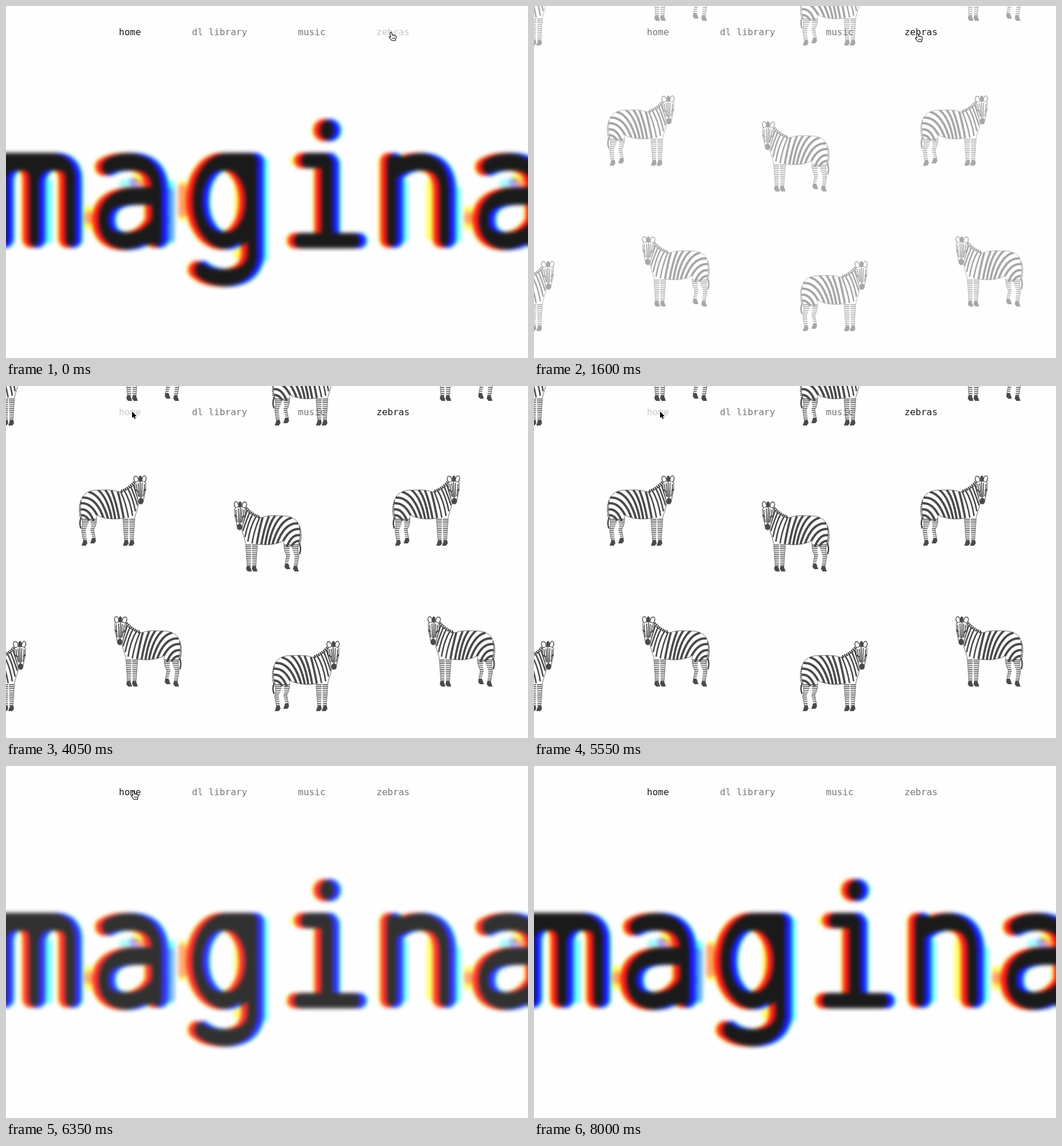
Write an HTML page that moves like this. It is 911 by 615 pixels and loops after 9360 ms.

```html
<!DOCTYPE html>
<html lang="en">
<head>
<meta charset="utf-8">
<title>Page transition</title>
<style>
html, body { margin: 0; width: 100%; height: 100%; overflow: hidden; background: #fefefe; }
svg { display: block; width: 911px; height: 615px; }

.nav { font: 16px "DejaVu Sans Mono", monospace; fill: #767676; }
.loop { animation: 9360ms step-end infinite; }

/* Blurred title: three ink layers, shifted sideways and multiplied */
#title { isolation: isolate; animation-name: title; }
.ink { mix-blend-mode: multiply; filter: blur(3.5px); fill: none; stroke-width: 31; stroke-linecap: round; stroke-linejoin: round; }
.cyan { stroke: rgb(26,255,255); }
.magenta { stroke: rgb(255,26,255); }
.yellow { stroke: rgb(255,255,26); }
.fringe { stroke-width: 15; opacity: .65; }
.faint { opacity: .4; }

#herd { animation-name: herd; }
#home { animation-name: home; }
#zebras { animation-name: zebras; }
#cursor { animation-name: cursor; }
#hand { animation-name: hand; }
#arrow { animation-name: arrow; }

@keyframes title {
  0% { opacity: 1 }
  11.111% { opacity: .62 }
  13.354% { opacity: .16 }
  15.224% { opacity: 0 }
  64.423% { opacity: .22 }
  66.132% { opacity: .6 }
  67.841% { opacity: .9 }
  69.764%, 100% { opacity: 1 }
}
@keyframes herd {
  0% { opacity: 0 }
  15.224% { opacity: .12 }
  17.094% { opacity: .48 }
  19.017% { opacity: .83 }
  20.94% { opacity: 1 }
  60.897% { opacity: .68 }
  62.713% { opacity: .22 }
  64.423%, 100% { opacity: 0 }
}
@keyframes home {
  0% { fill: #1a1a1a }
  15.224% { fill: #767676 }
  40.064% { fill: #a4a4a4 }
  41.666% { fill: #c8c8c8 }
  64.423%, 100% { fill: #1a1a1a }
}
@keyframes zebras {
  0% { fill: #c6c6c6 }
  15.224% { fill: #1a1a1a }
  64.423%, 100% { fill: #767676 }
}
@keyframes cursor {
  0% { transform: translate(673px, 45px) }
  17.094% { transform: translate(670px, 47px) }
  19.017% { transform: translate(664px, 50px) }
  20.94% { transform: translate(642px, 58px) }
  22.756% { transform: translate(612px, 64px); animation-timing-function: steps(6, end) }
  32.158% { transform: translate(362px, 84px) }
  33.76% { transform: translate(306px, 79px) }
  35.363% { transform: translate(284px, 70px); animation-timing-function: steps(5, end) }
  43.269% { transform: translate(220px, 44px) }
  60.897% { transform: translate(223px, 43px) }
  69.764% { transform: translate(235px, 40px) }
  71.367% { transform: translate(300px, 45px); animation-timing-function: steps(7, end) }
  82.264% { transform: translate(754px, 124px) }
  83.867%, 100% { transform: translate(841px, 125px) }
}
@keyframes hand {
  0% { opacity: 1 }
  20.94% { opacity: 0 }
  60.897% { opacity: 1 }
  71.367%, 100% { opacity: 0 }
}
@keyframes arrow {
  0% { opacity: 0 }
  20.94% { opacity: 1 }
  60.897% { opacity: 0 }
  71.367% { opacity: 1 }
  85.47%, 100% { opacity: 0 }
}
</style>
</head>
<body>
<svg viewBox="0 0 911 615">
  <defs>
    <g id="letter-a">
      <path d="M176 281Q190 272 214 272Q262 272 263 322V407"/>
      <path d="M262 332H222Q172 335 170 372Q170 410 209 411Q246 409 264 374"/>
    </g>
    <g id="letters">
      <path d="M-22 272H86M-7 407V300Q0 272 22 272Q49 272 49 305V407M49 302Q58 272 82 272Q112 272 112 304V407"/>
      <use href="#letter-a"/>
      <ellipse cx="380" cy="341" rx="46" ry="69"/>
      <path d="M386 272H430V436Q425 474 380 475Q352 474 338 461"/>
      <path d="M560 216.500V217.500" stroke-width="38"/>
      <path d="M521 270H560V410M509 410H611" stroke-width="27"/>
      <path d="M560 276V405" stroke-width="34"/>
      <path d="M673 272V407M673 295Q692 272 722 272Q764 273 765 322V407"/>
      <use href="#letter-a" x="663.500"/>
    </g>

    <clipPath id="body">
      <path d="M70 29C58 24 44 26 30 26C14 27 4 35 3 50C2 60 3 68 5 78L27 80 31 69C42 76 62 78 78 75L97 73C100 62 102 55 105 46L98 14C92 20 82 26 70 29Z"/>
    </clipPath>
    <clipPath id="legs">
      <path d="M4 72H19Q17 87 12 95L14 115H8L5 97Q8 86 4 72ZM18 72H31Q32 86 26 95L29 111H24L20 95Q24 86 18 72ZM77 70H87L86 115H80ZM88 70H98L95 115H89Z"/>
    </clipPath>
    <path id="hoof" d="M3 0H9L10 5 7 9H0Z"/>
    <g id="zebra" fill="none" stroke="#4a4a4a">
      <g clip-path="url(#body)" stroke-width="4">
        <path d="M1 70Q12 67 20 82M1 60Q17 56 26 80M2 49Q22 46 34 74M6 39Q31 37 44 77M17 29Q40 34 52 79"/>
        <path d="M33 25Q51 39 58 79M46 25Q59 42 64 79M57 26Q66 48 71 79M68 28Q74 50 79 78" stroke-width="3.800"/>
        <path d="M73 28Q83 50 87 76M79 26Q90 44 94 71M85 22Q94 38 99 63M90 18Q96 32 103 53M95 15Q99 28 104 43" stroke-width="2.600"/>
      </g>
      <path d="M97 16C91 21 82 27 70 29C58 24 44 26 30 26C14 27 4 35 3 50Q2 62 5 74M31 69C42 76 62 78 78 75M98 72Q102 60 105 48" stroke-width=".8"/>
      <path d="M74 28Q88 23 97 12" stroke-width="5" stroke-dasharray="2.500 1.200"/>
      <path d="M50 76V116" clip-path="url(#legs)" stroke-width="110" stroke-dasharray="1.400 1.900"/>
      <path d="M5 72Q8 86 5 97L8 114M31 70Q32 86 26 95L29 111M77 75L80 114M98 72L95 114" stroke-width=".7"/>
      <path d="M4 44Q-1 58 3 74" stroke-width="2" stroke-dasharray="2 1.200"/>
      <path d="M4 74Q0 84 4 93" stroke-width="2.600"/>
      <g fill="#4a4a4a" stroke="none">
        <use href="#hoof" x="5" y="114"/>
        <use href="#hoof" x="20" y="110"/>
        <use href="#hoof" x="77" y="114"/>
        <use href="#hoof" x="87" y="114"/>
      </g>
      <g fill="#fefefe" stroke-width="1.500">
        <ellipse cx="100" cy="7" rx="3.800" ry="5.500" transform="rotate(-18 100 7)"/>
        <ellipse cx="114" cy="6.500" rx="3.500" ry="5.500" transform="rotate(12 114 6.500)"/>
        <path d="M98 13Q108 7 117 13Q118 25 114 38L112 48Q108 52 104 48L102 37Q97 24 98 13Z" stroke-width="1"/>
      </g>
      <path d="M100.500 15Q101 26 104.500 37M104 14L106 38M107 12L108 40M110.500 13L110 38M114.500 15Q115 25 112.500 37" stroke-width="1.600"/>
      <path d="M99 25L104 29M113 28L117 24" stroke-width="2.400"/>
      <g fill="#4a4a4a" stroke="none">
        <ellipse cx="107.500" cy="6" rx="3" ry="5.500"/>
        <ellipse cx="108.500" cy="45" rx="4.500" ry="5.500"/>
      </g>
    </g>
    <g id="four">
      <use href="#zebra" transform="translate(127 156)"/>
      <use href="#zebra" transform="translate(516 201) scale(-1 1)"/>
      <use href="#zebra" transform="translate(307 402) scale(-1 1)"/>
      <use href="#zebra" transform="translate(464 445)"/>
    </g>
  </defs>

  <g id="title" class="loop">
    <g class="ink yellow">
      <use href="#letters" x="-7"/>
      <path class="fringe" d="M308 312V368M143 356V384M806 356V384M741 310V402M406 300V378M404 432V434M503 270H506M228 300L238 308M891 300L901 308"/>
    </g>
    <g class="ink magenta">
      <use href="#letters" x="-4"/>
      <use href="#letters" x="4"/>
      <path class="fringe faint" d="M308 318V362M144 366V374M807 366V374M286 325V405M222 308L240 312M885 308L903 312"/>
    </g>
    <g class="ink cyan">
      <use href="#letters" x="7"/>
      <path class="fringe" d="M73 310V408M287 312V408M450 272V440M786 322V406M694 310V406"/>
      <path class="fringe faint" d="M205 311L222 308M868 311L885 308"/>
    </g>
  </g>

  <g id="herd" class="loop">
    <use href="#four"/>
    <use href="#four" x="547"/>
    <use href="#four" x="-547"/>
    <use href="#four" y="-499"/>
    <use href="#four" x="547" y="-499"/>
    <use href="#four" x="-547" y="-499"/>
  </g>

  <g class="nav">
    <text id="home" class="loop" x="197" y="51">home</text>
    <text x="324.500" y="51">dl library</text>
    <text x="509.500" y="51">music</text>
    <text id="zebras" class="loop" x="646.500" y="51">zebras</text>
  </g>

  <g id="cursor" class="loop">
    <path id="arrow" class="loop" d="M0 .5V12L2.700 9.600 4.500 13.700 6.300 12.900 4.600 9H8.200Z" stroke="#fff" stroke-width="1.500" paint-order="stroke"/>
    <g id="hand" class="loop">
      <path d="M-1.500 9L-2.800 2.500Q-2.600.6-1 .9Q.1 1.200.4 3L1.200 6.200Q2.800 5 3.700 6.400Q5.200 5.600 6 7Q7.600 6.700 7.900 8.400Q8.300 11.500 6.500 13.500V15.500H.5L-4.300 9.600Q-4.600 7.800-3 8Z" fill="#fff" stroke="#111" stroke-width="1.100" stroke-linejoin="round"/>
      <path d="M1.600 10V13M3.500 10V13M5.300 10V13" stroke="#111" stroke-width=".8"/>
    </g>
  </g>
</svg>
</body>
</html>
```
